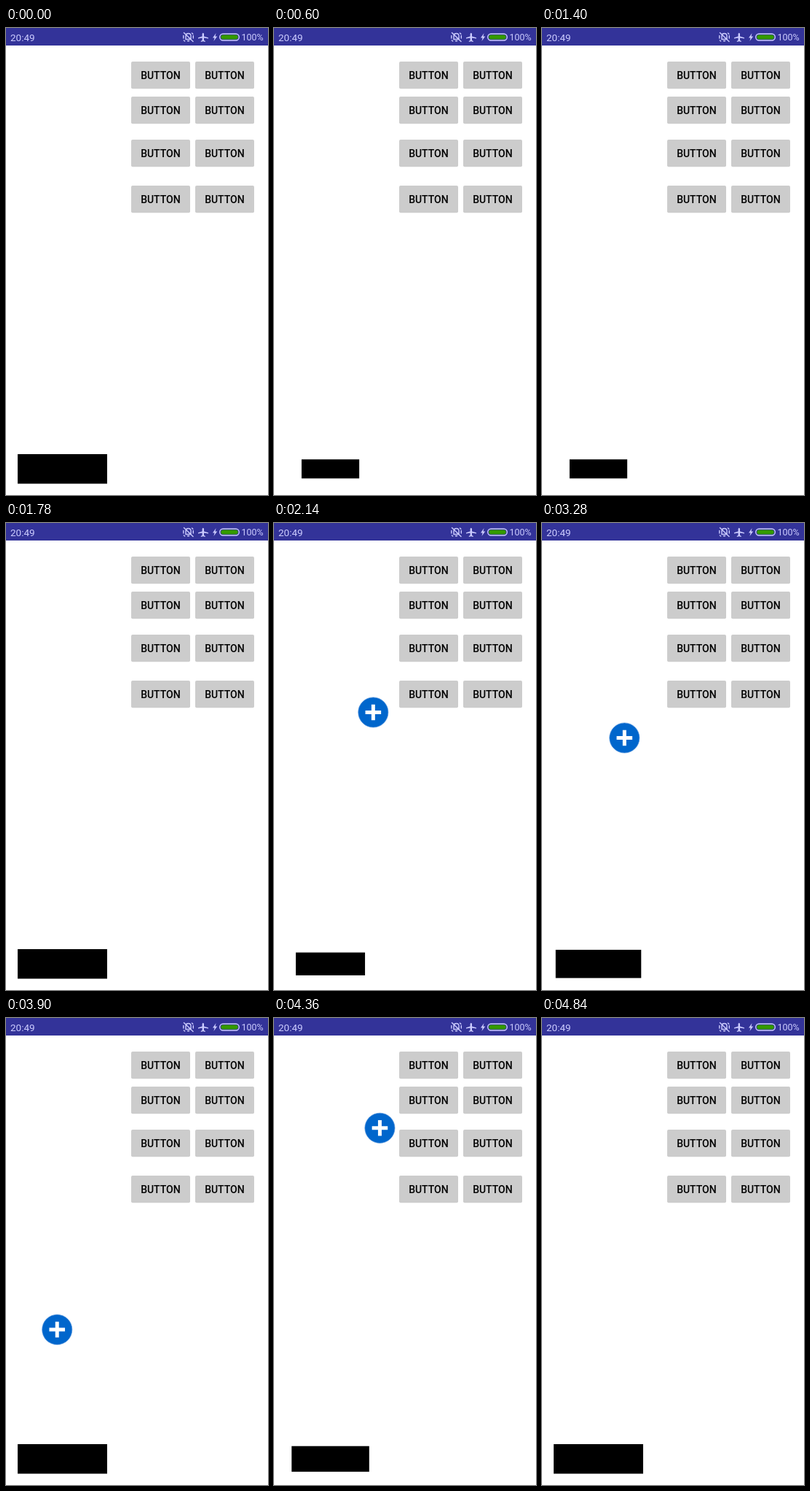
Write an HTML page that moves like this. It is 360 px wide and 640 px high and loops after 5100 ms.

```html
<!DOCTYPE html>
<html lang="en">
<head>
<meta charset="utf-8">
<title>Add to cart</title>
<style>
  html, body { margin: 0; height: 100%; overflow: hidden; background: #fff; }
  svg { display: block; width: 100%; height: 100%; font-family: Roboto, sans-serif; }
  .button rect { fill: #ccc; }
  .button text { font-size: 14px; font-weight: 500; text-anchor: middle; }
  .status { fill: #ccf; }
  .line { fill: none; stroke: #ccf; stroke-width: 1.4; stroke-linecap: round; }
</style>
</head>
<body>
<svg viewBox="0 0 360 640">
  <rect width="360" height="24" fill="#339"/>
  <g class="status">
    <text x="6" y="18" font-size="13.5">20:49</text>
    <text x="323.5" y="17" font-size="12.5">100%</text>
    <path d="M264 13.2 269.6 11.6V8Q270.8 5.6 272 8V11.6L278 13.2V14.6L272 13.6V16.8L273.8 18V19L270.8 18.2 267.8 19V18L269.6 16.8V13.6L264 14.6Z"/>
    <path d="M288.6 7 284 13.4H286.6L285.4 18 290.2 11.4H287.4Z"/>
  </g>
  <g class="line">
    <path d="M247 15.5V11Q247 7.5 250.5 7.5T254 11V15.5ZM249.5 17.8H251.5M244.5 6.5 257 18.5M243.8 10.5V14M257.3 10.5V14M255.5 7 256.8 8.2M244.4 17 245.6 18"/>
    <rect x="293.7" y="8" width="26.6" height="9" rx="4.5"/>
  </g>
  <rect x="295.3" y="9.5" width="23.4" height="6" rx="3" fill="#390"/>
  <g id="buttons"></g>
  <rect id="cart" x="-61.5" y="-20.25" width="123" height="40.5"/>
  <g id="item">
    <circle r="20.6" fill="#06c" stroke="#5c9ade" stroke-width=".7"/>
    <path d="M-10.8 0H10.8M0-10.8V10.8" stroke="#fff" stroke-width="5"/>
  </g>
</svg>
<script>
const LOOP = 5100, STEP = 20, FLIGHT = 150, PULSE = 90;
const END = { x: 56.4, y: 604 };
const rows = [46, 94, 153, 216], columns = [172, 260];

// Down the left column, then up the right one: [time, column, row]
const taps = [
  [60, 0, 0], [590, 0, 1], [1390, 0, 2], [2101, 0, 3],
  [2650, 1, 3], [3200, 1, 2], [3780, 1, 1], [4300, 1, 0]
];

const byId = id => document.getElementById(id);
const cart = byId('cart'), item = byId('item');

byId('buttons').innerHTML = rows.flatMap(y => columns.map(x =>
  `<g class="button" transform="translate(${x} ${y})">
    <rect width="81" height="37.3" rx="2"/><text x="40.4" y="24">BUTTON</text>
  </g>`)).join('');

function draw(time) {
  const [start, column, row] = taps.findLast(tap => tap[0] <= time) || [-LOOP, 0, 0];
  const age = time - start;

  const scale = 0.6 + 0.4 * Math.min(1, age / PULSE);
  cart.setAttribute('transform', `translate(77.5 604.25) scale(${scale})`);

  // Quadratic curve that leaves the button horizontally
  const t = age / FLIGHT;
  const bend = 2 * t * (1 - t) * 0.935 + t * t;
  const x0 = columns[column] + 24, y0 = rows[row] + 18.5;
  const x = x0 + (END.x - x0) * bend, y = y0 + (END.y - y0) * t * t;
  item.setAttribute('transform', `translate(${x} ${y})`);
  item.style.display = age > 12 && t <= 1 ? '' : 'none';
}

const origin = performance.now();
function tick() {
  const time = (performance.now() - origin) % LOOP;
  draw(Math.floor(time / STEP) * STEP);
  requestAnimationFrame(tick);
}
tick();
</script>
</body>
</html>
```
